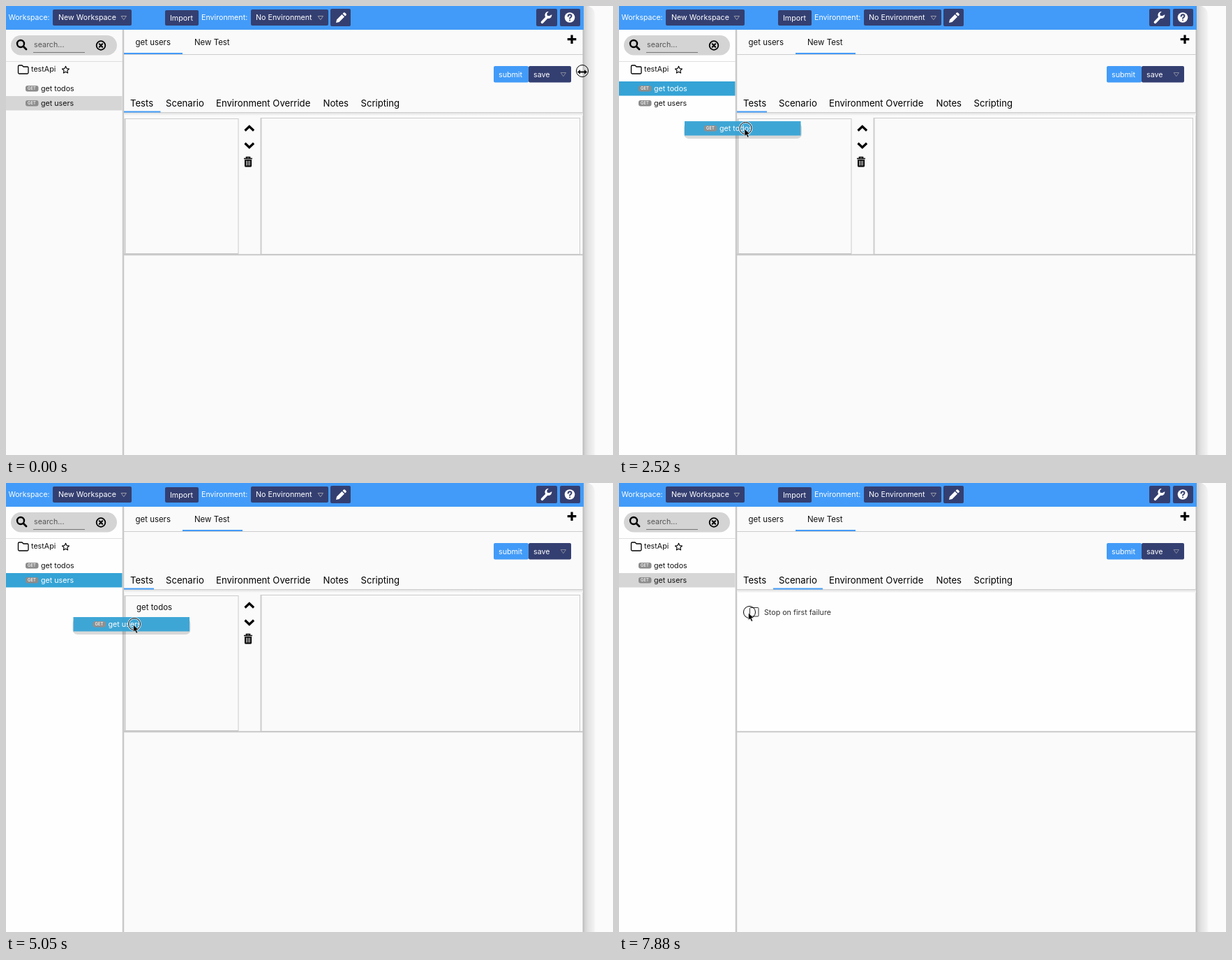
An HTML page for the animation above (8 s loop, 870 by 643 pixels).

```html
<!DOCTYPE html>
<html lang="en">
<head>
<meta charset="utf-8">
<title>Drag requests into a test</title>
<style>
  html, body { margin: 0; width: 100%; height: 100%; overflow: hidden; background: #fbfbfb; }
  svg { display: block; }
  text { font: 10.7px Inter, sans-serif; fill: #111; white-space: pre; }
  .tab { font-size: 11.45px; }
  .section { font-size: 13.15px; fill: #000; }
  .white, .selected text { fill: #fff; }
  .badge { font-size: 6px; font-weight: 500; fill: #fff; }
  .row .back { fill: none; }
  .row.inactive .back { fill: #d6d6d6; }
  .row.selected .back { fill: #35a3d5; }
  .line { fill: none; stroke: #000; stroke-linecap: round; stroke-linejoin: round; }
  .frame { fill: none; stroke: #ccc; }
  .navy { fill: #343f71; }
</style>
</head>
<body>
<svg width="870" height="643" viewBox="0 0 870 643">
  <defs>
    <linearGradient id="edge">
      <stop offset="0" stop-color="#cdcdcd"/><stop offset=".4" stop-color="#e3e3e3"/>
      <stop offset=".85" stop-color="#f1f1f1"/><stop offset="1" stop-color="#fbfbfb"/>
    </linearGradient>
    <linearGradient id="fall" x2="0" y2="1">
      <stop offset="0" stop-color="#c4c4c4"/><stop offset=".3" stop-color="#e4e4e4"/>
      <stop offset="1" stop-color="#fafafa"/>
    </linearGradient>
  </defs>

  <!-- Window -->
  <path d="M828 0h7q10 4 10 18v625h-17z" fill="url(#edge)"/>
  <rect width="828" height="643" fill="#fafafa"/>
  <rect id="sidebar" y="34" width="167" height="609"/>
  <rect id="panel" x="169" y="153" width="658" height="203" fill="#fefefe"/>
  <path d="M168 34V643" stroke="#c9c9c9" stroke-width="2.5"/>
  <path d="M827.5 34V643" stroke="#c0c0c0" stroke-width="2"/>

  <!-- Toolbar -->
  <rect width="828" height="34" fill="#429bf8"/>
  <g class="navy">
    <rect x="67" y="5" width="113" height="23" rx="2"/>
    <rect x="228" y="6" width="48" height="22" rx="2"/>
    <rect x="351" y="5" width="111" height="23" rx="2"/>
    <rect x="465" y="4" width="29" height="25" rx="2"/>
    <rect x="760" y="4" width="30" height="25" rx="2"/>
    <rect x="794" y="4" width="29" height="25" rx="2"/>
  </g>
  <g class="white">
    <text class="white" x="3.5" y="20" style="font-size:10.5px">Workspace:</text>
    <text class="white" x="75" y="20">New Workspace</text>
    <text class="white" x="235" y="21">Import</text>
    <text class="white" x="280" y="20">Environment:</text>
    <text class="white" x="358" y="20">No Environment</text>
    <path d="M473 24l1-4.5 7.5-7.5 3.500 3.500-7.500 7.500zM482.500 11l1.500-1.500q1-.6 2 .2l1.500 1.500q.8 1 0 2L486 14.500z"/>
    <path d="M768.500 23.200L775 16.500" stroke="#fff" stroke-width="3.800" stroke-linecap="round"/>
    <path d="M782.300 12.300a5 5 0 1 1-4.500-4.300l-2.600 2.700.5 3 3 .6z"/>
    <circle cx="808" cy="16.500" r="7.300"/>
    <path d="M805.600 14.700q.3-2.400 2.500-2.400 2.400.1 2.400 2.100 0 1.200-1.400 1.900-1 .5-1 1.500M808.100 20.400v.1" fill="none" stroke="#343f71" stroke-width="1.900" stroke-linecap="round"/>
  </g>
  <path class="line" d="M165.500 14.500h7l-3.500 5zM447.500 14.500h7l-3.500 5z" style="stroke:#9a9ca8"/>

  <!-- Sidebar -->
  <rect x="7" y="42" width="152" height="28.500" rx="14.250" fill="#d4d4d4"/>
  <circle class="line" cx="21" cy="54" r="5" stroke-width="2.400"/>
  <path class="line" d="M25 58l4 4" stroke-width="2.800"/>
  <text x="40" y="58.500" style="fill:#555">search...</text>
  <path d="M39 66.500h74" stroke="#777"/>
  <circle class="line" cx="136" cy="56.500" r="6.300" stroke-width="1.800"/>
  <path class="line" d="M133.800 54.300l4.400 4.400m0-4.400l-4.400 4.400" stroke-width="2.100"/>
  <path d="M0 79.500h167" stroke="#dedede"/>
  <path class="line" d="M17.500 95.500v-9q0-1.500 1.500-1.500h4l2 2h5.500q1.500 0 1.500 1.500v7q0 1.500-1.500 1.500H19q-1.500 0-1.500-1.500z" stroke-width="1.300"/>
  <text x="36" y="94">testApi</text>
  <path class="line" d="M85.500 86.300l1.500 3.300 3.500.4-2.600 2.400.7 3.500-3.100-1.700-3.100 1.700.7-3.500-2.600-2.400 3.500-.4z" stroke-width="1.100"/>
  <g id="todosRow" transform="translate(0 108)"></g>
  <g id="usersRow" transform="translate(0 129)"></g>

  <!-- Editor tabs -->
  <path d="M169 69.500h658" stroke="#ccc"/>
  <text class="tab" x="185.500" y="55.500">get users</text>
  <text class="tab" x="270" y="55.500">New Test</text>
  <rect id="tabMark" y="67" height="2" fill="#429bf8"/>
  <path d="M811 41.500v12.500M804.700 47.700h12.600" stroke="#000" stroke-width="3.200"/>
  <rect x="699" y="86" width="50" height="23.500" rx="2" fill="#429bf8"/>
  <rect class="navy" x="749" y="86" width="61" height="23.500" rx="2"/>
  <text class="white" x="706" y="101.500">submit</text>
  <text class="white" x="756" y="101.500">save</text>
  <path class="line" d="M795.500 95.500h7l-3.500 5z" style="stroke:#85899b"/>

  <!-- Section tabs -->
  <rect x="169" y="152" width="658" height="5" fill="url(#fall)"/>
  <text class="section" x="178" y="144">Tests</text>
  <text class="section" x="229" y="144">Scenario</text>
  <text class="section" x="301" y="144">Environment Override</text>
  <text class="section" x="454.500" y="144">Notes</text>
  <text class="section" x="508.500" y="144">Scripting</text>
  <rect id="sectionMark" y="150.500" height="2" fill="#429bf8"/>

  <g id="tests">
    <rect class="frame" x="170.500" y="161.500" width="162.500" height="193"/>
    <path class="frame" d="M170.500 161V355M169 355h164" stroke-width="2"/>
    <rect class="frame" x="365.500" y="160.500" width="457" height="195"/>
    <path class="frame" d="M365.500 160V356" stroke-width="2"/>
    <path d="M342.500 178.500l6.300-6 6.300 6M342.500 196.500l6.300 6 6.300-6" fill="none" stroke="#000" stroke-width="3.200"/>
    <path d="M341 218.500h12M344.500 218v-1.500h5v1.500" fill="none" stroke="#000" stroke-width="1.600"/>
    <path d="M342 220h10v9q0 1.500-1.500 1.500h-7q-1.500 0-1.500-1.500z"/>
    <path d="M344.700 221.500v7M347 221.500v7M349.300 221.500v7" stroke="#fafafa"/>
    <text id="todosItem" class="tab" x="187" y="182">get todos</text>
    <text id="usersItem" class="tab" x="187" y="213.500">get users</text>
  </g>
  <g id="scenario">
    <rect x="187.500" y="178.500" width="12.500" height="12.500" rx="1" fill="#fff" stroke="#333"/>
    <text x="208" y="188.500" style="fill:#333">Stop on first failure</text>
  </g>
  <path d="M169 356.300h658" stroke="#c9c9c9" stroke-width="2"/>

  <g id="ghost">
    <rect x="-1" y="2" width="169" height="23" rx="7" opacity=".14"/>
    <g id="ghostRow" opacity=".94"></g>
  </g>
  <g id="cursor">
    <circle id="halo" r="8.500" fill="none" stroke="#fff" stroke-width="3" opacity=".75"/>
    <circle r="8.500" fill="none" stroke="#000"/>
    <path id="arrow" d="M-1.500 1v10.500l2.400-2.200 1.800 4 2-.9-1.800-3.900h3.300z" stroke="#fff" stroke-width=".6"/>
    <path id="resize" d="M-7 1.500l4-3.200v2.200h6v-2.200l4 3.200-4 3.200v-2.200h-6v2.200z"/>
  </g>
</svg>
<script>
const $ = id => document.getElementById(id);
const LOOP = 8000, TICK = 148.8;

// Pointer path: tick, x, y
const path = [
  [0, 826, 93], [1, 790, 112], [3, 585, 196], [5, 400, 226], [6, 262, 218], [7, 170, 172],
  [8, 112, 128], [10, 87, 118], [12, 88, 119], [14, 115, 133], [16, 155, 156], [18, 208, 194],
  [20, 227, 205], [22, 227, 205], [25, 165, 180], [28, 87, 141], [29, 84, 139], [30, 83, 139],
  [31, 88, 140], [32, 102, 150], [34, 184, 202], [36, 222, 229], [37, 227, 231], [39, 227, 229],
  [44, 250, 141], [45, 251, 140], [47, 251, 140], [51, 195, 180], [53, 187, 185]
];

const rowMarkup = name => `
  <rect class="back" width="166.500" height="20.500"/>
  <rect x="28" y="6" width="18.500" height="8.500" rx="3" fill="#8c8c8c"/>
  <text class="badge" x="31" y="12.400">GET</text>
  <text x="50" y="14">${name}</text>`;

$('todosRow').innerHTML = rowMarkup('get todos');
$('usersRow').innerHTML = rowMarkup('get users');
$('ghostRow').setAttribute('class', 'row selected');

function pointerAt(tick) {
  const next = path.findIndex(key => key[0] >= tick);
  const [t1, x1, y1] = path[next];
  const [t0, x0, y0] = path[Math.max(0, next - 1)];
  const k = t1 > t0 ? (tick - t0) / (t1 - t0) : 0;
  return [x0 + (x1 - x0) * k, y0 + (y1 - y0) * k];
}

const show = (id, on) => $(id).style.display = on ? '' : 'none';
const move = (id, x, y) => $(id).setAttribute('transform', `translate(${x} ${y})`);
function mark(id, left, right) {
  $(id).setAttribute('x', left);
  $(id).setAttribute('width', right - left);
}

function draw(time) {
  const tick = Math.min(53, Math.floor((time % LOOP + 14) / TICK));
  const within = (from, to) => tick >= from && tick < to;
  const [x, y] = pointerAt(tick);
  const scenario = tick >= 47;
  const dragTodos = within(13, 21), dragUsers = within(32, 38);

  $('sidebar').setAttribute('fill', tick < 9 ? '#fafafa' : '#fefefe');
  $('todosRow').setAttribute('class', within(11, 30) ? 'row selected' : 'row');
  $('usersRow').setAttribute('class',
    tick < 11 || scenario ? 'row inactive' : tick >= 30 ? 'row selected' : 'row');

  mark('tabMark', tick < 1 ? 169 : 253, tick < 1 ? 253 : 339);
  mark('sectionMark', scenario ? 221 : 169, scenario ? 292 : tick < 17 ? 221.5 : 212);
  show('tests', !scenario);
  show('scenario', scenario);
  show('panel', scenario);
  show('todosItem', tick >= 21);
  show('usersItem', tick >= 38);

  show('ghost', dragTodos || dragUsers);
  $('ghostRow').innerHTML = rowMarkup(dragTodos ? 'get todos' : 'get users');
  move('ghost', x - 87.5, y - 10);

  move('cursor', x, y);
  show('halo', dragTodos || dragUsers);
  show('arrow', tick > 0);
  show('resize', tick === 0);
}

const start = performance.now();
function frame() {
  draw(performance.now() - start);
  requestAnimationFrame(frame);
}
frame();
</script>
</body>
</html>
```
